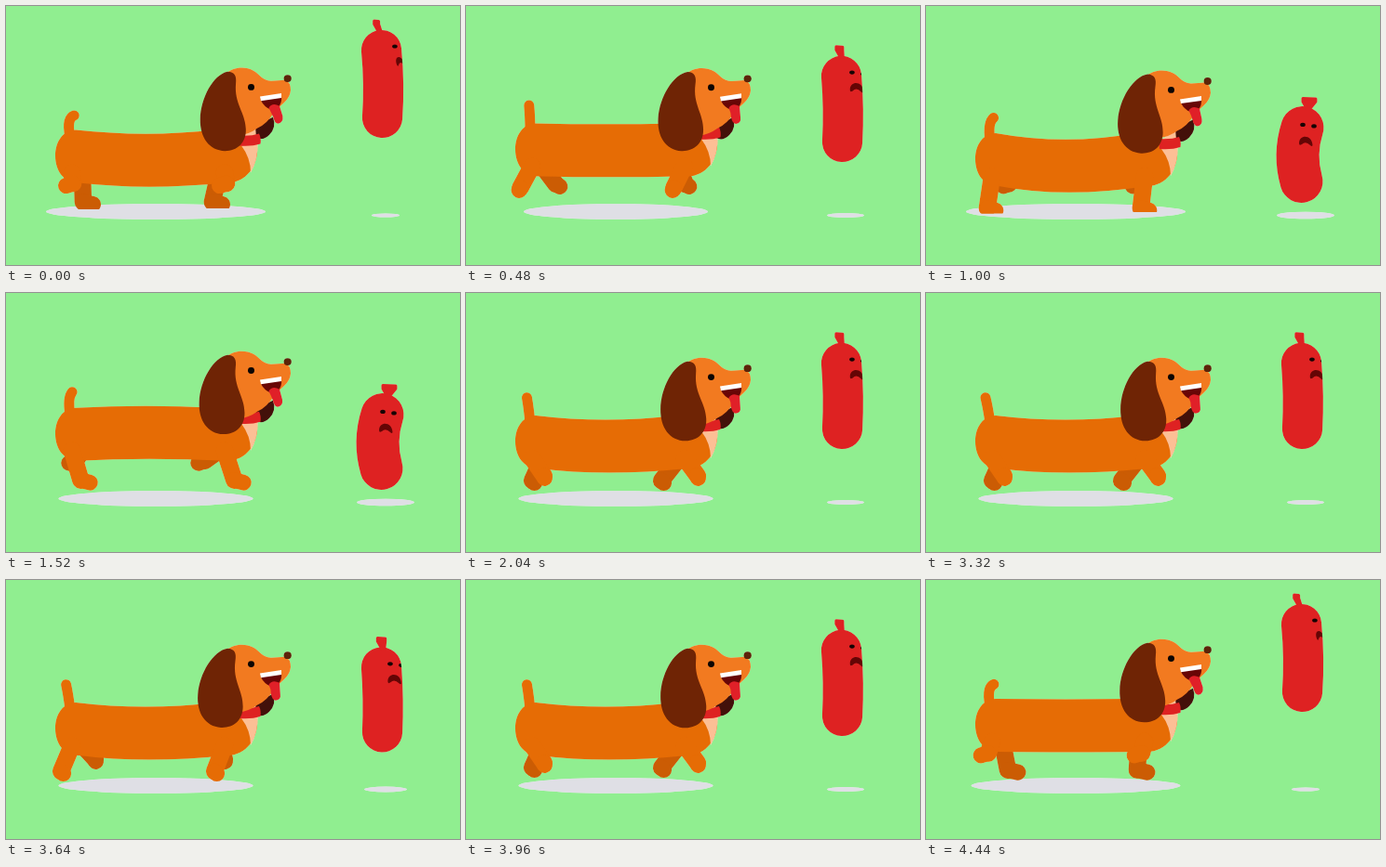
Animation of 488x279 px, one loop 4480 ms. Source, as an HTML page with a canvas:

```html
<!DOCTYPE html>
<html lang="en">
<head>
<meta charset="utf-8">
<title>Dachshund chasing a sausage</title>
<style>
  html, body { margin: 0; width: 100%; height: 100%; overflow: hidden; background: #90ee90; }
  canvas { display: block; width: 488px; height: 279px; filter: drop-shadow(0 0 .5px rgba(255, 255, 255, .7)); }
</style>
</head>
<body>
<canvas id="stage"></canvas>
<script>
const LOOP = 4480, STRIDE = 640, BOB = STRIDE / 2, STEP = 40;
const canvas = document.getElementById('stage');
const g = canvas.getContext('2d');
const scale = window.devicePixelRatio || 1;
canvas.width = 488 * scale;
canvas.height = 279 * scale;

const COLOR = {
  coat: '#e66c05', face: '#f27a20', far: '#cb5c04', ear: '#6f2405', farEar: '#43100a',
  red: '#de2222', cream: '#fcbf95', mouth: '#680606', shade: '#dfdfe5', nose: '#5c2408'
};

// A cosine between -1 and 1 that peaks at the given time.
const wave = (time, period, peak) => Math.cos(2 * Math.PI * (time - peak) / period);
const bodyDrop = time => 2 + 7.28 * wave(time, BOB, 54);

function fill(path, color) {
  g.fillStyle = color;
  g.fill(new Path2D(path));
}

function line(path, color, width) {
  g.strokeStyle = color;
  g.lineWidth = width;
  g.lineCap = g.lineJoin = 'round';
  g.stroke(new Path2D(path));
}

function oval(x, y, rx, ry, color) {
  g.fillStyle = color;
  g.beginPath();
  g.ellipse(x, y, rx, ry, 0, 0, Math.PI * 2);
  g.fill();
}

// The paw circles round its centre and rolls from heel to toe; the floor cuts it flat.
function leg(time, hipX, centerX, lift, floor, color) {
  const drop = bodyDrop(time);
  const toeX = centerX + 18 * wave(time, STRIDE, 210);
  const toeY = 200 - lift + drop + 12 * wave(time, STRIDE, 320);
  const heelX = toeX - 1.5 - 9.5 * wave(time, STRIDE, 290), heelY = toeY - 2.5;
  g.save();
  g.beginPath();
  g.rect(0, 0, 488, floor);
  g.clip();
  line(`M${hipX} ${174 + drop}L${heelX} ${heelY}`, color, 18.5);
  line(`M${heelX} ${heelY}L${toeX} ${toeY}`, color, 17);
  g.restore();
}

// A ballistic jump, then a squash on the ground before the next one.
function jump(time) {
  const airtime = 228, rest = STRIDE / 2 - airtime;
  const d = Math.abs((time + 20 + STRIDE / 2) % STRIDE - STRIDE / 2);
  const lift = Math.max(0, 1 - (d / airtime) ** 2);
  const squash = d > airtime ? 1 - ((STRIDE / 2 - d) / rest) ** 2 : 0;
  return [lift, squash];
}

function drawSausage(time) {
  const [lift, squash] = jump(time);
  const width = 43.2 + 4.8 * squash;
  const bottom = 212 - 70.5 * lift - width / 2;
  const y = bottom - 68 - 5 * lift + 17.5 * squash;
  const x = 403.5 + 1.7 * squash;
  const bend = 405.5 + 1.5 * lift - 18 * squash;
  const turn = 4.9 + 8.1 * lift - 8.5 * squash;

  line(`M${x} ${y}Q${bend} ${(y + bottom) / 2} ${404.5 - 1.7 * squash} ${bottom}`, COLOR.red, width);
  const knotX = 412 - 1.07 * turn, half = (17 - .7 * turn) / 2 - 1.5, neck = 411 - .72 * turn;
  const knot = `M${knotX - half} ${y - 31.5}L${knotX + half} ${y - 31}V${y - 28}
    L${neck + 1.5} ${y - 20}H${neck - 1.5}L${knotX - half} ${y - 28}Z`;
  fill(knot, COLOR.red);
  line(knot, COLOR.red, 3);

  // The face slides out of sight over the right edge.
  g.save();
  g.globalCompositeOperation = 'source-atop';
  const eyeY = y - 3.2 - turn * .06;
  oval(405 + turn, eyeY, 2.8, 2.1, '#170303');
  oval(417 + turn, eyeY + 1.5, 2.8, 2.1, '#170303');
  const away = Math.max(0, turn - 10);
  g.translate(408 + 1.18 * turn, y + 15 - turn * .2);
  g.rotate(-.12 * away);
  g.scale(1 - .14 * away, 1);
  fill('M-7 2C-7 -8 7 -8 7.5 4Q7 6 5 4Q0 -1 -4 3Q-7 5 -7 2Z', '#650505');
  g.restore();

  const shadow = 28 - 13 * lift + 5 * squash;
  oval(408, 225.5, shadow, shadow / 8.5 + .2, COLOR.shade);
}

function drawTail(time, drop) {
  const curl = wave(time, BOB, 304);
  const sway = 2.2 * (.22 - wave(time, LOOP, 3000));
  const tipX = 68.5 + 3.4 * curl + sway, tipY = 110.5 + drop + 2 * curl;
  line(`M69 ${136 + drop}Q${65.7 - 2 * curl + sway / 2} ${118 + drop - 2.5 * curl} ${tipX} ${tipY}`, COLOR.coat, 11);
}

function drawBody(time) {
  const drop = bodyDrop(time), sag = 2.5 + 4.8 * wave(time, BOB, 62);
  const top = 128 + drop, low = top + 57;
  leg(time + BOB, 82, 85, 4, 219, COLOR.far);
  leg(time + BOB, 229, 224, 4, 218, COLOR.far);
  drawTail(time, drop);

  fill(`M75 ${top}Q150 ${top + 2 * sag} 225 ${top}L254 ${top + 6}L270 ${top + 17}
    C272 ${top + 38} 258 ${low} 238 ${low}Q150 ${low + 2 * sag} 78 ${low}
    C62 ${low} 53 ${top + 44} 53 ${top + 28}C53 ${top + 13} 61 ${top} 75 ${top}Z`, COLOR.coat);
  leg(time, 71, 73, 0, 223.5, COLOR.coat);
  leg(time, 235, 238, 0, 222, COLOR.coat);

  fill(`M253 ${top + 17}L270.5 ${top + 14}Q271 ${top + 32} 263 ${top + 46}
    Q263 ${top + 30} 253 ${top + 17}Z`, COLOR.cream);
  return top;
}

function drawHead(time, top) {
  const drop = .8 + 4.1 * wave(time, BOB, 82);
  const swing = 1 + 1.84 * wave(time, STRIDE, 400);
  const flap = 1.2 + 1.4 * wave(time, BOB, 290);
  fill(`M252 ${top + 8}L271 ${128 + drop}V${top + 10}Z`, COLOR.cream);
  g.save();
  g.translate(0, drop);
  fill('M268 128L287 119Q291 130 283 138Q276 145 269 141Z', COLOR.farEar);
  g.restore();
  fill(`M250 ${top + 6}Q263 ${top + 7} 272 ${top + 4}Q274.5 ${top + 9} 273.5 ${top + 15}
    Q264 ${top + 18} 251 ${top + 17}Z`, COLOR.red);

  g.save();
  g.translate(0, drop);
  fill(`M236 73C243 65 257 64 266 69C273 73 275 79 285 80L300 79Q306 81 306 90
    C305 99 299 103 295 107L288 114Q281 126 270 131Q262 137 250 139L236 120Z`, COLOR.face);
  oval(302.7, 77.4, 4.1, 3.9, COLOR.nose);
  oval(263.5, 86.8, 3.5, 3.4, '#0c0503');
  fill('M273.5 99L296 96Q297 104 292 109Q287 113 281 109Q275 105 273.5 99Z', COLOR.mouth);
  fill(`M282.5 109Q286 103 294 107L${295 + flap} ${119 - flap / 2}Q${296 + flap} 125 ${290 + flap} 126
    Q${286 + flap} 125 ${285 + flap} 119Q285 114 282.5 109Z`, '#e02028');
  fill('M273 96.8L296 93.3L296 98.3L274 101.5Z', '#fff');

  g.translate(240, 72);
  g.rotate(swing * Math.PI / 180);
  g.translate(-240, -72);
  fill(`M238 70C246 70 248 75 247 83C245 105 257 114 257.5 132C258 147 248 155.5 235 155.5
    C218 155 208 141 208.5 121C209 98 223 73 238 70Z`, COLOR.ear);
  g.restore();
}

function draw(now) {
  const time = Math.floor(now % LOOP / STEP) * STEP;
  g.setTransform(scale, 0, 0, scale, 0, 0);
  g.clearRect(0, 0, 488, 279);
  drawSausage(time);
  oval(161, 221.5, 108.5 + 10.3 * wave(time, BOB, 20), 8.3, COLOR.shade);
  drawHead(time, drawBody(time));
}

let start;
function tick(now) {
  if (start === undefined) start = now;
  draw(Math.max(0, now - start));
  requestAnimationFrame(tick);
}
draw(0);
requestAnimationFrame(tick);
</script>
</body>
</html>
```
